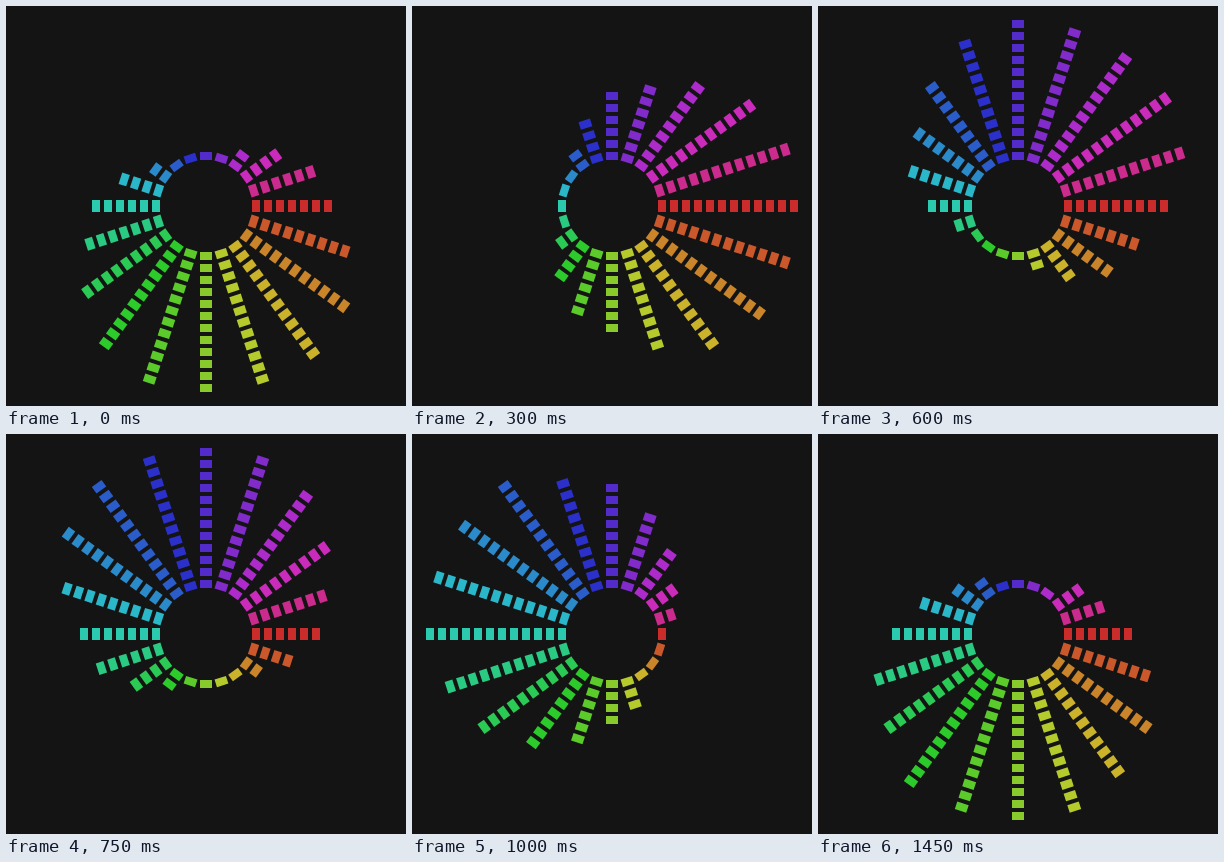
An HTML page with a canvas that plays this animation: 400 px wide and 400 px high, repeating every 1.5 s.

```html
<!DOCTYPE html>
<html lang="en">
<head>
<meta charset="utf-8">
<title>Radial wave</title>
<style>
  html, body { margin: 0; width: 100%; height: 100%; overflow: hidden; background: #141414; }
  canvas { display: block; width: 400px; height: 400px; }
</style>
</head>
<body>
<canvas id="stage" width="400" height="400"></canvas>
<script>
  const ctx = document.getElementById('stage').getContext('2d');
  const TAU = Math.PI * 2;
  const LOOP = 1500, STEP = 50;
  const SPOKES = 20, INNER = 50, GAP = 12, LEVELS = 12;
  const START = TAU * 81 / 360; // direction of the crest at time zero

  function drawSpoke(i, crest) {
    const angle = i * TAU / SPOKES;
    const level = LEVELS * (1 + Math.cos(angle - crest)) / 2;
    ctx.save();
    ctx.translate(200, 200);
    ctx.rotate(angle);
    ctx.fillStyle = `hsl(${i * 17}, 65%, 48%)`;
    for (let k = 0; k < level; k++) ctx.fillRect(INNER + k * GAP - 4, -6, 8, 12);
    ctx.restore();
  }

  function draw(now) {
    // The wave advances in discrete 50 ms steps.
    const step = Math.floor((now + 0.5) / STEP) % (LOOP / STEP);
    const crest = START - TAU * step * STEP / LOOP;
    ctx.fillStyle = '#141414';
    ctx.fillRect(0, 0, 400, 400);
    for (let i = 0; i < SPOKES; i++) drawSpoke(i, crest);
  }

  function tick() {
    draw(performance.now());
    requestAnimationFrame(tick);
  }
  tick();
</script>
</body>
</html>
```
